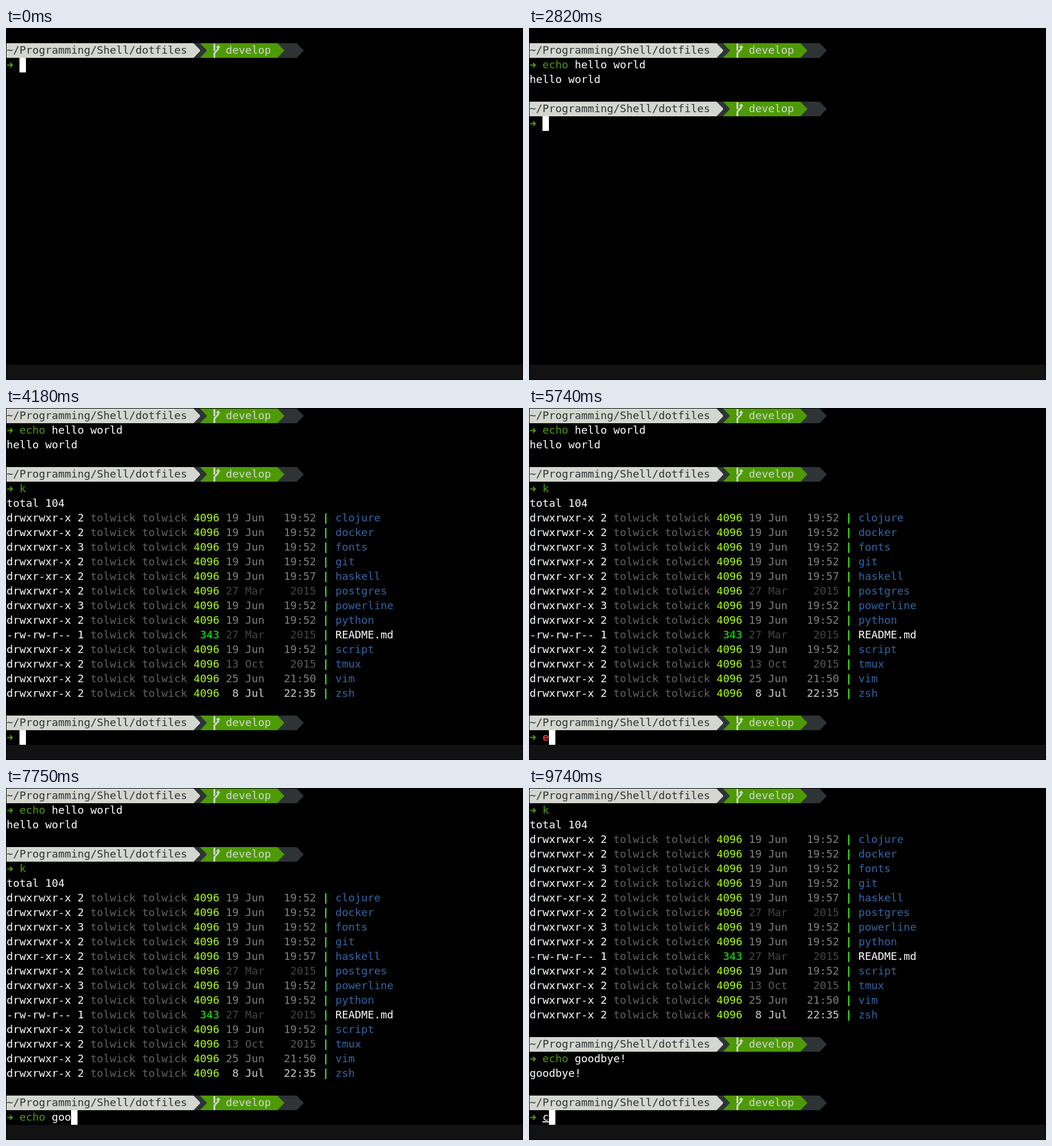
An HTML page that plays this animation: 882x602 px, repeating every 9800 ms.

```html
<!DOCTYPE html>
<html lang="en">
<head>
<meta charset="utf-8">
<title>Terminal session</title>
<style>
  html, body { margin: 0; width: 100%; height: 100%; overflow: hidden; background: #000; }
  svg { display: block; width: 882px; height: 602px; }
  text { font: 18.27px "DejaVu Sans Mono", monospace; white-space: pre; }
</style>
</head>
<body>
<svg id="stage" viewBox="0 0 882 602">
  <rect width="882" height="602" fill="#000"/>
  <g id="screen"></g>
  <rect x="1" y="576" width="880" height="25" fill="#121212"/>
</svg>
<script>
const LOOP = 9800, CELL = 11, ROW = 25, BASELINE = 18, LAST_ROW = 22;
const GREEN = '#4e9a06', LIGHT = '#d3d7cf', DARK = '#2e3436', BLUE = '#3465a4', RED = '#ef2929';
const screen = document.getElementById('screen');

function el(parent, tag, attrs = {}, text) {
  const node = document.createElementNS('http://www.w3.org/2000/svg', tag);
  for (const key in attrs) node.setAttribute(key, attrs[key]);
  if (text !== undefined) node.textContent = text;
  parent.appendChild(node);
  return node;
}
const colX = col => 1 + col * CELL;
const put = (g, col, text, fill = '#fff') => el(g, 'text', { x: colX(col), y: BASELINE, fill }, text);
const block = (g, from, to, fill) => el(g, 'rect', { x: colX(from), y: 0, width: (to - from) * CELL, height: ROW, fill });
const wedge = (g, col, fill) => el(g, 'path', { d: `M${colX(col)} 0l12 ${ROW / 2}l-12 ${ROW / 2}Z`, fill });

function drawPrompt(g) {
  block(g, 0, 29, LIGHT);
  block(g, 29, 30, DARK);
  wedge(g, 29, LIGHT);
  block(g, 30, 42, GREEN);
  wedge(g, 30, DARK);
  block(g, 42, 45, DARK);
  wedge(g, 42, GREEN);
  wedge(g, 45, DARK);
  put(g, 0, '~/Programming/Shell/dotfiles', DARK);
  // Branch symbol
  el(g, 'path', { d: 'M355.5 1V13M362 6V10L355.5 17V25', fill: 'none', stroke: LIGHT, 'stroke-width': 3 });
  el(g, 'path', { d: 'M358 7.5L362 3L366 7.5Z', fill: LIGHT });
  put(g, 34, 'develop', LIGHT);
}

function drawInput(g) {
  el(g, 'path', { d: 'M2 12.5H10M7 8.8L10.7 12.5L7 16.2', fill: 'none', stroke: GREEN, 'stroke-width': 2 });
  return put(g, 2, '');
}

const AGES = { Jul: '#d0d0d0', Jun: '#808080', Oct: '#585858', Mar: '#444444' };

function drawEntry(g, [name, date, time, links = 2, perms = 'drwxrwxr-x']) {
  const isDir = perms[0] === 'd', age = AGES[date.slice(3)];
  put(g, 0, `${perms} ${links}`);
  put(g, 13, 'tolwick tolwick', '#626262');
  put(g, 29, isDir ? '4096' : ' 343', isDir ? '#afff00' : '#00ff00');
  put(g, 34, date, age);
  put(g, 43, time.padStart(5), age);
  put(g, 49, '|', '#40ff00').style.fontWeight = 'bold';
  put(g, 51, name, isDir ? BLUE : '#fff');
}

const entries = [
  ['clojure', '19 Jun', '19:52'],
  ['docker', '19 Jun', '19:52'],
  ['fonts', '19 Jun', '19:52', 3],
  ['git', '19 Jun', '19:52'],
  ['haskell', '19 Jun', '19:57', 2, 'drwxr-xr-x'],
  ['postgres', '27 Mar', '2015'],
  ['powerline', '19 Jun', '19:52', 3],
  ['python', '19 Jun', '19:52'],
  ['README.md', '27 Mar', '2015', 1, '-rw-rw-r--'],
  ['script', '19 Jun', '19:52'],
  ['tmux', '13 Oct', '2015'],
  ['vim', '25 Jun', '21:50'],
  ['zsh', ' 8 Jul', '22:35']
];

// The whole session, line by line
const lines = [], inputs = [];
function addLine(draw) {
  const g = el(screen, 'g', { transform: `translate(0 ${1 + lines.length * ROW})` });
  if (draw) draw(g);
  lines.push(g);
}
function addCommand(full) {
  addLine();
  addLine(drawPrompt);
  addLine(g => inputs.push({ line: lines.length, full, node: drawInput(g) }));
}
const addText = text => addLine(g => put(g, 0, text));

addCommand('echo hello world');
addText('hello world');
addCommand('k');
addText('total 104');
entries.forEach(entry => addLine(g => drawEntry(g, entry)));
addCommand('echo goodbye!');
addText('goodbye!');
addCommand('c');
const cursor = el(screen, 'rect', { width: CELL, height: ROW, fill: '#fff' });

// Shell syntax highlighting: commands green, unknown words red, path prefixes underlined
function showInput(node, text) {
  if (node.shown === text) return;
  node.shown = text;
  node.textContent = '';
  const [, word, rest] = text.match(/^(\S*)(.*)$/);
  const known = word === 'echo' || word === 'k';
  const underline = 'text-decoration:underline';
  const style = known ? `fill:${GREEN}` : word === 'c' ? underline : `fill:${RED};font-weight:bold`;
  el(node, 'tspan', { style }, word);
  if (/^ [hg]$/.test(rest)) {
    el(node, 'tspan', {}, ' ');
    el(node, 'tspan', { style: underline }, rest[1]);
  } else {
    el(node, 'tspan', {}, rest);
  }
}

// Steps: when, lines on screen, typed text, cursor line and column (null hides it)
const steps = [];
const step = (at, rows, text = '', line = rows - 1, col = 2 + text.length) => steps.push({ at, rows, text, line, col });
function spread(from, to, rows, texts) {
  texts.forEach((text, i) => step(from + (to - from) * i / (texts.length - 1), rows, text));
}
const prefixes = (text, from, to) => Array.from({ length: to - from + 1 }, (_, i) => text.slice(0, from + i));

const hello = inputs[0].full, bye = inputs[2].full;
step(0, 3);
spread(270, 1290, 3, prefixes(hello, 1, 7));
step(1330, 3, hello.slice(0, 8));
spread(1490, 2220, 3, prefixes(hello, 9, 15));
step(2410, 3, hello);
step(2820, 7);
step(3390, 7, '', 6, null);
step(3800, 7, 'k');
step(4000, 7, 'k', 7, 0);
step(4060, 8, '', 8, 0);
step(4120, 21, '', 21, 0);
step(4180, 24);
step(4660, 24, '', 23, null);
step(5260, 24);
spread(5740, 6720, 24, prefixes('echo gho', 1, 8));
step(6850, 24, 'echo ghoo');
spread(7130, 8010, 24, [...prefixes('echo gho', 6, 8).reverse(), ...prefixes(bye, 7, 10)]);
step(8240, 24, bye.slice(0, 11));
step(8520, 24, bye.slice(0, 12));
step(8950, 24, bye);
step(9330, 28);
step(9740, 28, 'c');

function render(time) {
  const now = steps.filter(s => s.at <= time + 0.01).pop();
  lines.forEach((g, i) => g.setAttribute('visibility', i < now.rows ? 'visible' : 'hidden'));
  inputs.forEach(({ line, full, node }) => showInput(node, line < now.rows - 1 ? full : now.text));
  cursor.setAttribute('visibility', now.col === null ? 'hidden' : 'visible');
  cursor.setAttribute('x', colX(now.col || 0));
  cursor.setAttribute('y', 1 + now.line * ROW);
  screen.setAttribute('transform', `translate(0 ${-Math.max(0, now.line - LAST_ROW) * ROW})`);
}

const start = performance.now();
function tick() {
  render((performance.now() - start) % LOOP);
  requestAnimationFrame(tick);
}
tick();
</script>
</body>
</html>
```
